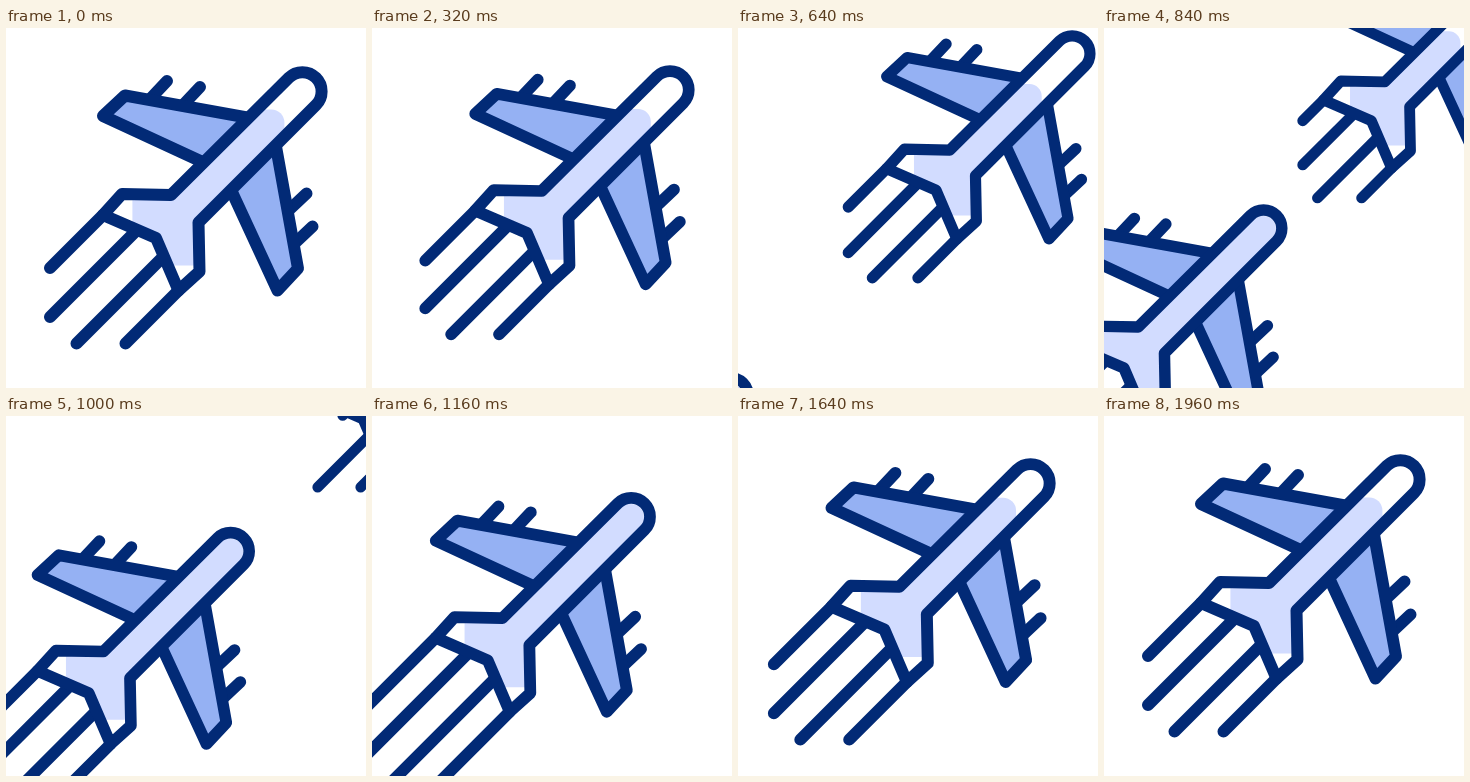
An HTML page with a canvas that plays this animation: 360x360 px, repeating every 2000 ms.

```html
<!DOCTYPE html>
<html lang="en">
<head>
<meta charset="utf-8">
<title>Airplane</title>
<style>
html, body { margin: 0; width: 100%; height: 100%; overflow: hidden; background: #fff; }
canvas { display: block; width: 360px; height: 360px; }
</style>
</head>
<body>
<canvas id="stage" width="360" height="360"></canvas>
<script>
const ctx = document.getElementById('stage').getContext('2d');
const LOOP = 2000, STEP = 40, REST = 160, ENTER = 640, END = 1960;
const INK = '#022a76', WING = '#95b1f3', BODY = '#d2dcff';
const NOSE = { x: 296.4, y: 63.4, r: 19.2 };
const AXIS = 359.5;

// The plane is symmetric about the line x + y = AXIS
const same = p => p;
const flip = ([x, y]) => [AXIS - y, AXIS - x];

const wing = [[241, 89.5], [119, 67.5], [97, 88], [196.5, 134]];
const engines = [[[161, 53], [145, 70]], [[194, 59], [178, 76]]];
const tail = [[165, 167], [116, 166], [97, 187], [150, 210]];
const trailStarts = [[97, 187], [131, 202]];
const TRAIL_END = 44;

function path(points) {
  ctx.beginPath();
  points.forEach(p => ctx.lineTo(...p));
}

function line(...points) {
  path(points);
  ctx.stroke();
}

function fill(color) {
  ctx.fillStyle = color;
  ctx.fill();
}

function hullPath() {
  path([...tail, ...tail.slice(0, 3).reverse().map(flip)]);
  ctx.arc(NOSE.x, NOSE.y, NOSE.r, Math.PI / 4, -Math.PI * 3 / 4, true);
  ctx.closePath();
}

// The tint stops short of the tail tips and, by `gap`, of the nose
function drawHull(gap) {
  hullPath();
  fill('#fff');
  ctx.save();
  ctx.clip();
  ctx.beginPath();
  ctx.roundRect(NOSE.x - 170, NOSE.y + gap, 170 - gap, 174 - gap, 13);
  fill(BODY);
  ctx.restore();
  hullPath();
  ctx.stroke();
}

function drawTrail(start, cut, side) {
  const x = Math.min(start[0], TRAIL_END + cut);
  line(side(start), side([x, start[1] + start[0] - x]));
}

function drawPlane({ x, scale, cut, upperCut, gap }) {
  ctx.save();
  ctx.translate(x, NOSE.x + NOSE.y - x);
  ctx.scale(scale, scale);
  ctx.translate(-NOSE.x, -NOSE.y);
  ctx.lineWidth = 12;
  ctx.lineCap = ctx.lineJoin = 'round';
  ctx.strokeStyle = INK;

  for (const side of [same, flip]) {
    const short = side === same ? upperCut : cut;
    trailStarts.forEach(start => drawTrail(start, short, side));
    engines.forEach(e => line(...e.map(side)));
    path(wing.map(side));
    fill(WING);
    ctx.stroke();
  }
  drawHull(gap);
  ctx.restore();
}

// Accelerates to the upper right while shrinking
function leaving(t) {
  const u = Math.max(0, t - REST) / 840;
  const cut = 28 * u ** 1.65;
  return {
    x: NOSE.x + 189 * u ** 2.88,
    scale: 1 - 0.122 * u,
    cut,
    upperCut: cut + 55 * u ** 8,
    gap: 18 + 45 * u ** 2
  };
}

// Glides in from the lower left and settles
function arriving(t) {
  const rest = Math.max(0, 306 * Math.exp(-0.00395 * (t - ENTER)) - 2);
  const q = Math.max(0, END - t) / (END - ENTER);
  const cut = -14 * (rest / 19) ** 0.68;
  return {
    x: NOSE.x - rest,
    scale: 1 - 0.07 * q ** 2.5,
    cut,
    upperCut: cut,
    gap: 18 - 31 * Math.min(1, 8 * q ** 3)
  };
}

function draw(t) {
  ctx.fillStyle = '#fff';
  ctx.fillRect(0, 0, 360, 360);
  drawPlane(leaving(t));
  drawPlane(arriving(t));
}

let begin;
function tick(now) {
  begin ??= now;
  const t = Math.max(0, now - begin) % LOOP;
  draw(Math.floor(t / STEP) * STEP);
  requestAnimationFrame(tick);
}
draw(0);
requestAnimationFrame(tick);
</script>
</body>
</html>
```
